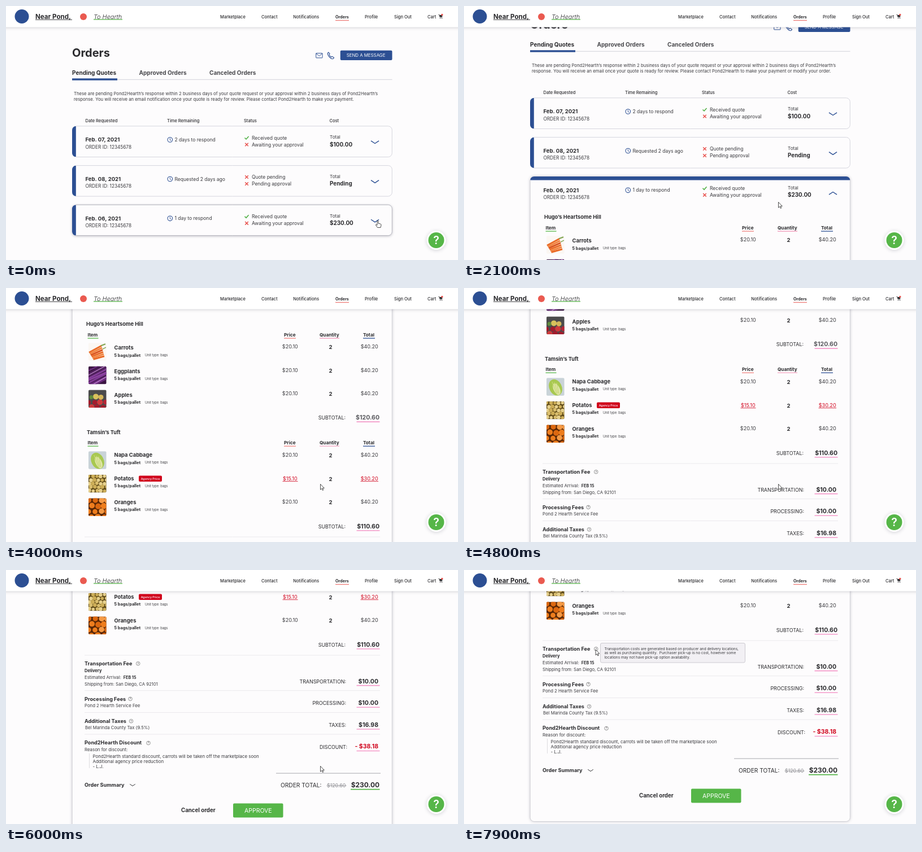
Recreate the animation shown at these times as an HTML page with a canvas. Size 800 by 450 pixels, loop 8000 ms.

```html
<!DOCTYPE html>
<html lang="en">
<head>
<meta charset="utf-8">
<title>Orders</title>
<style>
html, body { margin: 0; width: 100%; height: 100%; overflow: hidden; background: #fdfcfd; }
canvas { display: block; width: 800px; height: 450px; }
</style>
</head>
<body>
<canvas id="stage"></canvas>
<script>
const canvas = document.getElementById('stage');
const ctx = canvas.getContext('2d');
const dpr = window.devicePixelRatio || 1;
canvas.width = 800 * dpr;
canvas.height = 450 * dpr;

const LOOP = 8000, STEP = 100;
const INK = '#2b2b2e', SOFT = '#3a3a3e', BLUE = '#2c4f93', GREEN = '#56b648', RED = '#d0021b';
const PINK = '#f59ccb', CORAL = '#f0837f', PAGE = '#fdfcfd';

// Each key: time, then values; linear between keys.
const SCROLL = [[1850, 0], [2000, 22], [2500, 160], [3000, 266], [3100, 268], [3200, 268],
  [4000, 360], [4800, 490], [5200, 490], [6000, 650], [6200, 658], [6700, 676]];
const POINTER = [[800, 658, 380], [1400, 659.5, 326.5], [1550, 659.5, 326.5], [1950, 556.5, 347.5],
  [6850, 556.5, 347.5], [7550, 233, 141]];

function track(keys, t) {
  if (t <= keys[0][0]) return keys[0].slice(1);
  for (let i = 1; i < keys.length; i++) {
    const a = keys[i - 1], b = keys[i];
    if (t <= b[0]) {
      const k = (t - a[0]) / (b[0] - a[0]);
      return a.slice(1).map((v, j) => v + (b[j + 1] - v) * k);
    }
  }
  return keys[keys.length - 1].slice(1);
}
const ramp = (t, a, b) => Math.min(1, Math.max(0, (t - a) / (b - a)));

// y is the middle of the capitals
function text(s, x, y, size, weight = 400, color = weight > 400 ? INK : SOFT, align = 'left', style = '') {
  ctx.font = `${style} ${weight} ${size}px Inter, "Noto Sans", sans-serif`;
  ctx.textAlign = align;
  ctx.fillStyle = color;
  ctx.fillText(s, x, y + size * 0.36);
}
const bold = (s, x, y, size, color = INK, align = 'left') => text(s, x, y, size, 700, color, align);
function line(points, color, width = 1) {
  ctx.beginPath();
  points.forEach(([x, y], i) => i ? ctx.lineTo(x, y) : ctx.moveTo(x, y));
  ctx.strokeStyle = color;
  ctx.lineWidth = width;
  ctx.stroke();
}
const rule = (x1, x2, y, color, width = 1) => line([[x1, y], [x2, y]], color, width);
function box(x, y, w, h, r, fill, stroke) {
  ctx.beginPath();
  ctx.roundRect(x, y, w, h, r);
  if (fill) { ctx.fillStyle = fill; ctx.fill(); }
  if (stroke) { ctx.strokeStyle = stroke; ctx.lineWidth = 1; ctx.stroke(); }
}
function disc(x, y, r, fill) {
  ctx.beginPath();
  ctx.arc(x, y, r, 0, 7);
  ctx.fillStyle = fill;
  ctx.fill();
}
function ring(x, y, r, color, width) {
  ctx.beginPath();
  ctx.arc(x, y, r, 0, 7);
  ctx.strokeStyle = color;
  ctx.lineWidth = width;
  ctx.stroke();
}
function shadow(blur, color, dy = 0) {
  ctx.shadowBlur = blur * dpr;
  ctx.shadowColor = color;
  ctx.shadowOffsetY = dy * dpr;
}
function chevron(x, y, up, w = 7, color = BLUE) {
  const d = up ? -w / 3 : w / 3;
  line([[x - w, y - d], [x, y + d], [x + w, y - d]], color, w / 5);
}
function mark(x, y, ok) {
  if (ok) return line([[x - 3.5, y], [x - 1, y + 2.5], [x + 3.5, y - 2.6]], '#4cae41', 1.5);
  line([[x - 2.8, y - 2.8], [x + 2.8, y + 2.8]], '#e8534f', 1.5);
  line([[x - 2.8, y + 2.8], [x + 2.8, y - 2.8]], '#e8534f', 1.5);
}
function info(x, y) {
  ring(x, y, 3.3, '#666', 0.7);
  text('?', x, y, 5, 500, '#555', 'center');
}

function cardFrame(y, h, open, hover) {
  ctx.save();
  if (open) shadow(5, 'rgba(40,40,60,.28)');
  else if (hover) shadow(4, 'rgba(40,40,60,.3)', 1);
  box(117, y, 566.5, h, 7, PAGE);
  ctx.restore();
  ctx.save();
  ctx.beginPath();
  ctx.roundRect(117, y, 566.5, h, 7);
  ctx.clip();
  ctx.fillStyle = BLUE;
  if (open) ctx.fillRect(117, y, 567, 6.5);
  else ctx.fillRect(117, y, 6.8, h);
  ctx.restore();
  ctx.save();
  ctx.beginPath();
  if (open) ctx.rect(110, y + 6.5, 580, h);
  else ctx.rect(123.8, y - 2, 565, h + 4);
  ctx.clip();
  box(117.2, y, 566.1, h, 7, null, open ? '#d2d2d7' : hover ? '#b3b3bc' : '#d6d6de');
  ctx.restore();
}
function cardRow(y, date, wait, first, firstOk, second, cost) {
  bold(date, 140.5, y + 24.5, 9.5);
  text('ORDER ID: 12345678', 140.5, y + 37.5, 8.25);
  ring(290.3, y + 24.5, 4.3, BLUE, 1.1);
  line([[290.3, y + 21.7], [290.3, y + 24.8], [292.6, y + 25.8]], BLUE, 0.9);
  text(wait, 298.5, y + 24.5, 8.5);
  mark(426, y + 21, firstOk);
  text(first, 435, y + 21, 8.5);
  mark(426, y + 33, false);
  text(second, 435, y + 33, 8.5);
  text('Total', 573, y + 20, 8.2);
  bold(cost, 573, y + 32.5, 9.9);
}

// Flat stand-ins for the produce pictures
function photo(x, y, kind) {
  let seed = kind * 77 + 5;
  const rnd = () => (seed = (seed * 16807) % 2147483647) / 2147483647;
  const pick = list => list[Math.floor(rnd() * list.length)];
  const slant = (colors, n, w) => {
    for (let i = 0; i < n; i++) {
      const o = i * 34 / n - 2;
      line([[-2, o + 10 + rnd() * 3], [34, o - 8 + rnd() * 3]], pick(colors), w);
    }
  };
  const pile = (colors, r, top) => {
    for (let row = 0, cy = top; cy < 36; cy += r * 2, row++)
      for (let cx = row % 2 * r; cx < 36; cx += r * 2.2)
        disc(cx + rnd() * 1.5, cy + rnd() * 1.5, r * (0.85 + rnd() * 0.25), pick(colors));
  };
  ctx.save();
  ctx.translate(x, y);
  ctx.beginPath();
  ctx.roundRect(0, 0, 31.5, 31.5, 2);
  ctx.clip();
  ctx.fillStyle = ['#fbf7f3', '#3b1642', '#4b4b4c', '#c9d3d8', '#5f4a18', '#5a2705'][kind];
  ctx.fillRect(0, 0, 32, 32);
  if (kind === 0) {
    for (let i = 0; i < 6; i++)
      line([[1 + i * 1.5, 17 + i * 2.4], [23 + i, 5 + i * 3.7]], pick(['#ea6a26', '#f28440', '#d9531c']), 3);
    line([[22, 5], [30, 2]], '#7fa552', 2);
    line([[25, 11], [31, 8]], '#7fa552', 1.5);
  }
  if (kind === 1) {
    slant(['#6d2a80', '#8b43a0', '#52205f'], 8, 3);
    slant(['#c993d6', '#7a3390'], 5, 1.2);
  }
  if (kind === 2) {
    pile(['#b82335', '#cf3a3c', '#a31b2c'], 4.6, 21);
    disc(13, 12, 5, '#d9c25c');
    disc(22, 13, 4.5, '#d5b75a');
    disc(5, 13, 3.5, '#5f8c3c');
  }
  if (kind === 3) {
    ctx.beginPath();
    ctx.ellipse(16, 17, 11, 15, -0.45, 0, 7);
    ctx.fillStyle = '#a8c850';
    ctx.fill();
    ctx.beginPath();
    ctx.ellipse(18, 20, 5.5, 11, -0.45, 0, 7);
    ctx.fillStyle = '#e0e6a8';
    ctx.fill();
    for (let i = 0; i < 3; i++) line([[10 + i * 4, 7 + i], [18 + i * 2, 28]], '#c5d873', 1.2);
  }
  if (kind === 4) pile(['#d9bd6c', '#cdae58', '#e6d08c'], 3.2, 2);
  if (kind === 5) pile(['#ee7d1d', '#f59a45', '#dc6810'], 5, 3);
  ctx.restore();
}

function heads(y) {
  [['Item', 144.5, 163.5, GREEN], ['Price', 492, 513, CORAL],
   ['Quantity', 555, 590, '#f5a3c0'], ['Total', 632, 653, BLUE]].forEach(([s, a, b, c]) => {
    bold(s, a, y, 8.2);
    rule(a, b, y + 6, c, 1.3);
  });
}
function item(name, kind, y, costY, deal) {
  photo(146, costY - 6.8, kind);
  bold(name, 191.5, y, 9.4);
  bold('5 bags/pallet', 191.5, y + 13, 7.3);
  text('Unit type: bags', 246, y + 13.3, 5.6);
  const color = deal ? RED : SOFT;
  text(deal ? '$15.10' : '$20.10', 502.8, costY, 9, 400, color, 'center');
  bold('2', 574.5, costY + 0.6, 9.5, INK, 'center');
  text(deal ? '$30.20' : '$40.20', 643.2, costY, 9.1, 400, color, 'center');
  if (deal) {
    rule(489.5, 516.5, costY + 5, RED, 0.8);
    rule(627.5, 659, costY + 5, RED, 0.8);
    box(235, y - 5, 41, 10.5, 2, RED);
    text('Agency Price', 255.5, y + 0.3, 5.3, 500, '#fff', 'center');
  }
}
function amount(label, value, y, labelX, valueX, color = INK) {
  text(label, labelX, y + 0.7, 8.9, 400, INK, 'right');
  bold(value, valueX, y, 10.5, color, 'right');
  rule(620.5, 661.5, y + 7.8, PINK, 1.6);
}

function details() {
  bold('Hugo’s Heartsome Hill', 142, 423.5, 9.3);
  heads(443);
  ['Carrots', 'Eggplants', 'Apples'].forEach((s, i) => item(s, i, 466 + i * 41.6, 464 + i * 41.6));
  amount('SUBTOTAL:', '$120.60', 589.3, 601, 661, '#59595e');

  bold('Tamsin’s Tuft', 143, 615.5, 9.2);
  heads(634.2);
  ['Napa Cabbage', 'Potatos', 'Oranges'].forEach((s, i) =>
    item(s, i + 3, 656 + i * 41.6, 656 + i * 41.6, i === 1));
  amount('SUBTOTAL:', '$110.60', 782, 601, 661);

  [801, 863.7, 902.5, 941].forEach(y => rule(139, 662, y, '#ebe9ed'));
  bold('Transportation Fee', 139, 815.5, 9.15);
  info(233.7, 815.7);
  bold('Delivery', 139, 828, 7.5);
  text('Estimated Arrival:', 139, 840, 7.8);
  bold('FEB 15', 207.8, 840, 7.2);
  text('Shipping from: San Diego, CA 92101', 139, 852, 7.65);
  amount('TRANSPORTATION:', '$10.00', 846.8, 602, 659);

  bold('Processing Fees', 139, 878.5, 9.15);
  info(220, 878.3);
  text('Pond 2 Hearth Service Fee', 139, 890.5, 7.75);
  amount('PROCESSING:', '$10.00', 885.5, 602, 659);

  bold('Additional Taxes', 139, 917.3, 9.15);
  info(221.5, 917.7);
  text('Bel Marinda County Tax (9.5%)', 140, 929.4, 7.75);
  amount('TAXES:', '$16.98', 924.2, 602, 659);

  bold('Pond2Hearth Discount', 139, 956, 9.15);
  info(252, 956.5);
  text('Reason for discount:', 139, 968, 7.85);
  line([[147.5, 975], [147.5, 1001]], '#dddde0', 1);
  text('Pond2Hearth standard discount, carrots will be taken off the marketplace soon', 153.5, 980.5, 7.92);
  text('Additional agency price reduction', 153.5, 989.3, 7.92);
  text('- L.J.', 153.5, 998.2, 7.92);
  amount('DISCOUNT:', '- $38.18', 962.7, 604, 659, RED);

  rule(478, 663, 1010.2, '#b9b9be', 1.2);
  bold('Order Summary', 139, 1031, 9.15);
  chevron(224, 1031, false, 4.8, INK);
  text('ORDER TOTAL:', 486, 1031.7, 10.2, 400, INK);
  text('$120.60', 568, 1031.7, 8.8, 400, '#8d8d92');
  rule(567.5, 602.5, 1032, '#8d8d92', 0.9);
  bold('$230.00', 661, 1030.8, 11.9, INK, 'right');
  rule(610, 661.5, 1038.6, GREEN, 1.8);

  bold('Cancel order', 310, 1075.8, 9.7);
  box(402, 1063.5, 88.5, 25, 2, GREEN);
  text('APPROVE', 446.3, 1076, 10.5, 400, '#fff', 'center');
}

function pageTop(open) {
  bold('Orders', 117, 83, 20);
  box(548.7, 83.7, 11.3, 8.2, 0.5, null, BLUE);
  line([[548.7, 84], [554.4, 88.6], [560, 84]], BLUE, 1);
  ctx.beginPath();
  ctx.moveTo(570.8, 82);
  ctx.bezierCurveTo(567.5, 84, 570, 88, 573, 91);
  ctx.bezierCurveTo(576, 94, 579, 95, 580.5, 91.5);
  ctx.lineTo(577.3, 89.3);
  ctx.lineTo(575.6, 90.5);
  ctx.quadraticCurveTo(573, 88.8, 571.8, 86.2);
  ctx.lineTo(573, 84.8);
  ctx.closePath();
  ctx.strokeStyle = BLUE;
  ctx.lineWidth = 1.1;
  ctx.stroke();
  box(591.7, 78.8, 91.8, 17.2, 2, BLUE);
  text('SEND A MESSAGE', 637, 87.5, 7.85, 400, '#fff', 'center');

  rule(117, 683.5, 130.3, '#d2d2da');
  ctx.fillStyle = BLUE;
  ctx.fillRect(117, 128.3, 80, 3.4);
  bold('Pending Quotes', 117, 118.7, 10.05);
  bold('Approved Orders', 235.5, 118.7, 10.05, '#4a4a4e');
  bold('Canceled Orders', 360, 118.7, 10.05, '#4a4a4e');

  text('These are pending Pond2Hearth’s response within 2 business days of your quote request or your approval within 2 business days of Pond2Hearth’s', 120, 155, 7.72);
  const late = open >= 0.5;
  text(`response. You will receive an email ${late ? '' : 'notification '}once your quote is ready for review. Please contact Pond2Hearth to make your payment${late ? ' or modify your order' : ''}.`, 120, 165.5, 7.72);

  [['Date Requested', 140.5], ['Time Remaining', 285], ['Status', 421], ['Cost', 572.5]]
    .forEach(([s, x]) => text(s, x, 203.3, 7.5, 500));
}

function navbar() {
  ctx.save();
  shadow(5, 'rgba(60,60,80,.2)', 1);
  ctx.fillStyle = '#fff';
  ctx.fillRect(-10, -10, 820, 47.5);
  ctx.restore();
  disc(28, 18.5, 12.5, BLUE);
  bold('Near Pond,', 52, 19, 11.6);
  rule(52, 117, 24.3, INK, 0.9);
  disc(137, 19, 6, '#ea5a50');
  text('To Hearth', 155, 19, 10.9, 300, INK, 'left', 'italic');
  rule(155, 206, 23.8, GREEN, 1.2);
  [['Marketplace', 379], ['Contact', 452], ['Notifications', 508.3], ['Profile', 635],
   ['Sign Out', 687], ['Cart', 746]].forEach(([s, x]) => text(s, x, 19.2, 7.55, 500));
  bold('Orders', 583, 19.2, 7.1);
  rule(583, 607, 25.5, CORAL, 1.4);
  line([[765.5, 15.5], [767, 15.5], [768.2, 19.8], [772, 19.8]], INK, 0.9);
  ctx.fillStyle = INK;
  ctx.fillRect(767.3, 16, 5, 3);
  disc(768.5, 21.5, 0.8, INK);
  disc(771.5, 21.5, 0.8, INK);
  disc(771.8, 15.5, 1.7, '#e8534f');
}

function help() {
  ctx.save();
  shadow(6, 'rgba(60,60,80,.22)', 1);
  disc(761.5, 415, 17, '#fff');
  ctx.restore();
  disc(761.5, 415, 14, GREEN);
  text('?', 761.5, 415, 19.5, 600, '#fff', 'center');
}

function tooltip() {
  box(241.5, 129.5, 256, 34.5, 2.5, '#f2f0f4', '#cccad0');
  ['Transportation costs are generated based on producer and delivery locations,',
   'as well as purchasing quantity.  Purchaser pick-up is no cost, however some',
   'locations may not have pick-up option availability.']
    .forEach((s, i) => text(s, 248.5, 139.5 + i * 7.6, 6.46));
}

function pointer(x, y, hand) {
  ctx.save();
  ctx.translate(x, y);
  ctx.lineJoin = 'round';
  ctx.strokeStyle = '#222';
  ctx.fillStyle = '#fff';
  ctx.lineWidth = 0.8;
  const shape = hand
    ? 'M-1 1Q0-.8 1 1V5.2L4.8 6Q6 6.4 6 8L5 12.5H-.5L-3.6 8.2Q-3.6 6.6-2.2 7.4L-1 8.4Z'
    : 'M0 0V9.8L2.3 7.7L3.8 11L5.3 10.3L3.8 7.1H6.8Z';
  const path = new Path2D(shape);
  ctx.fill(path);
  ctx.stroke(path);
  ctx.restore();
}

function draw(t) {
  const scroll = Math.round(track(SCROLL, t)[0]);
  const [px, py] = track(POINTER, t);
  const open = ramp(t, 100, 400);
  ctx.setTransform(dpr, 0, 0, dpr, 0, 0);
  ctx.fillStyle = PAGE;
  ctx.fillRect(0, 0, 800, 450);

  ctx.save();
  ctx.translate(0, -scroll);
  pageTop(open);
  const over = py + scroll;
  cardFrame(212.8, 54.7, false, false);
  cardRow(212.5, 'Feb. 07, 2021', '2 days to respond', 'Received quote', true, 'Awaiting your approval', '$100.00');
  chevron(653, 241.2, false);
  cardFrame(282.6, 54.5, false, over > 282 && over < 337);
  cardRow(282, 'Feb. 08, 2021', 'Requested 2 days ago', 'Quote pending', false, 'Pending approval', 'Pending');
  chevron(653, 311, false);
  if (open < 1) {
    cardFrame(352.2, 54.5, false, true);
    chevron(653, 380.6, false);
  }
  if (open > 0) {
    ctx.globalAlpha = open;
    cardFrame(352, 769.5, true, false);
    chevron(653, 381.8, true);
    details();
    ctx.globalAlpha = 1;
  }
  cardRow(351.8, 'Feb. 06, 2021', '1 day to respond', 'Received quote', true, 'Awaiting your approval', '$230.00');
  ctx.restore();

  navbar();
  help();
  if (t >= 7600) {
    ctx.globalAlpha = ramp(t, 7500, 7700);
    tooltip();
    ctx.globalAlpha = 1;
  }
  pointer(px, py, t < 900);
}

function tick() {
  const t = performance.now() % LOOP;
  draw(Math.floor(t / STEP) * STEP);
  requestAnimationFrame(tick);
}
tick();
</script>
</body>
</html>
```
